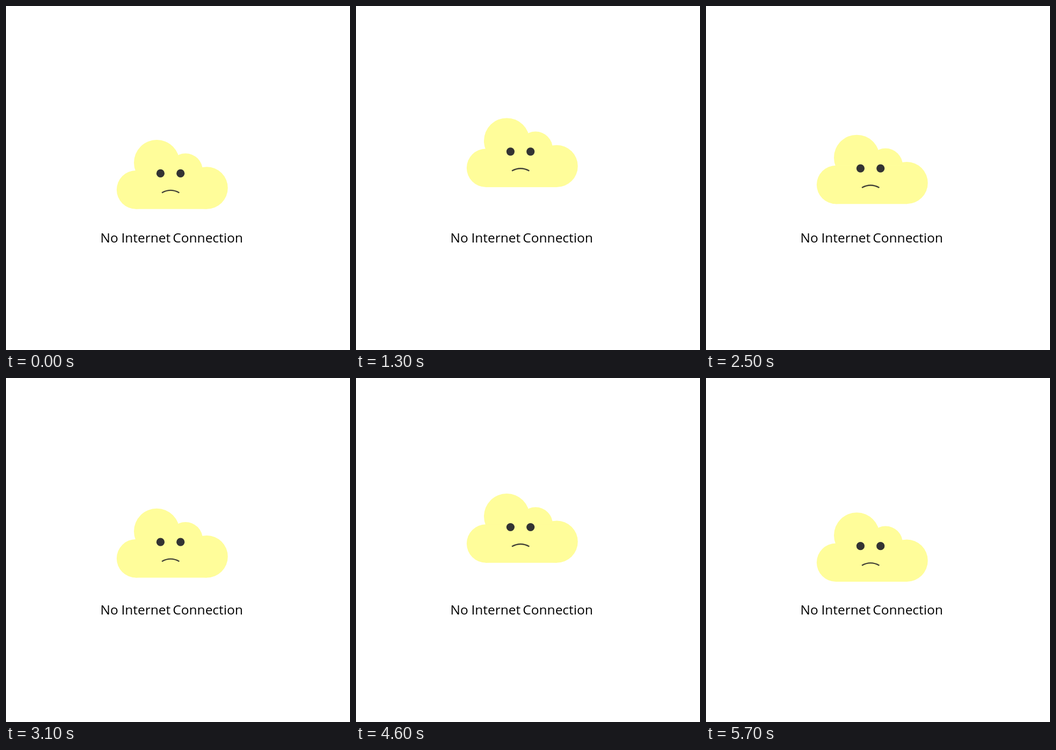
Recreate the animation shown at these times as an HTML page. Size 640 by 640 pixels, loop 5800 ms.

```html
<!DOCTYPE html>
<html lang="en">
<head>
<meta charset="utf-8">
<title>No Internet Connection</title>
<style>
  html, body { margin: 0; width: 100%; height: 100%; overflow: hidden; background: #fff; }
  svg { display: block; width: 100%; height: 100%; }
  text { font: 24.5px "Open Sans", "Noto Sans", sans-serif; fill: #000; }
</style>
</head>
<body>
<svg viewBox="0 0 640 640">
  <g id="cloud">
    <g fill="#fffd9a">
      <circle cx="280.5" cy="42.5" r="42.5"/>
      <circle cx="334" cy="57.2" r="32"/>
      <circle cx="373.5" cy="89.5" r="39.2"/>
      <circle cx="241.7" cy="92.9" r="35.8"/>
      <rect x="241" y="57.2" width="132.5" height="71.5"/>
    </g>
    <g fill="#333">
      <circle cx="287.4" cy="62.4" r="7.6"/>
      <circle cx="324.7" cy="62.4" r="7.6"/>
    </g>
    <path d="M290 98.4Q306.2 89.4 322.4 98.4" fill="none" stroke="#444338" stroke-width="2.3"/>
  </g>
  <text y="440"><tspan x="175.6">No</tspan> <tspan x="214.5">Internet</tspan> <tspan x="310.3">Connection</tspan></text>
</svg>
<script>
  const LOOP = 5800, STEP = 100;
  const cloud = document.getElementById('cloud');

  // [time in ms, top of the cloud], joined by straight lines
  const keys = [[0, 249], [1400, 205.25], [2800, 249], [2900, 249], [4300, 205.5], [5700, 250.3], [5800, 250.3]];

  function topAt(time) {
    const i = keys.findIndex(([t]) => t > time);
    const [t0, y0] = keys[i - 1], [t1, y1] = keys[i];
    return y0 + (y1 - y0) * (time - t0) / (t1 - t0);
  }

  function draw(now) {
    const time = Math.floor((now % LOOP) / STEP) * STEP;
    cloud.setAttribute('transform', `translate(0 ${topAt(time).toFixed(2)})`);
  }

  const start = performance.now();
  function tick() {
    draw(performance.now() - start);
    requestAnimationFrame(tick);
  }
  tick();
</script>
</body>
</html>
```
